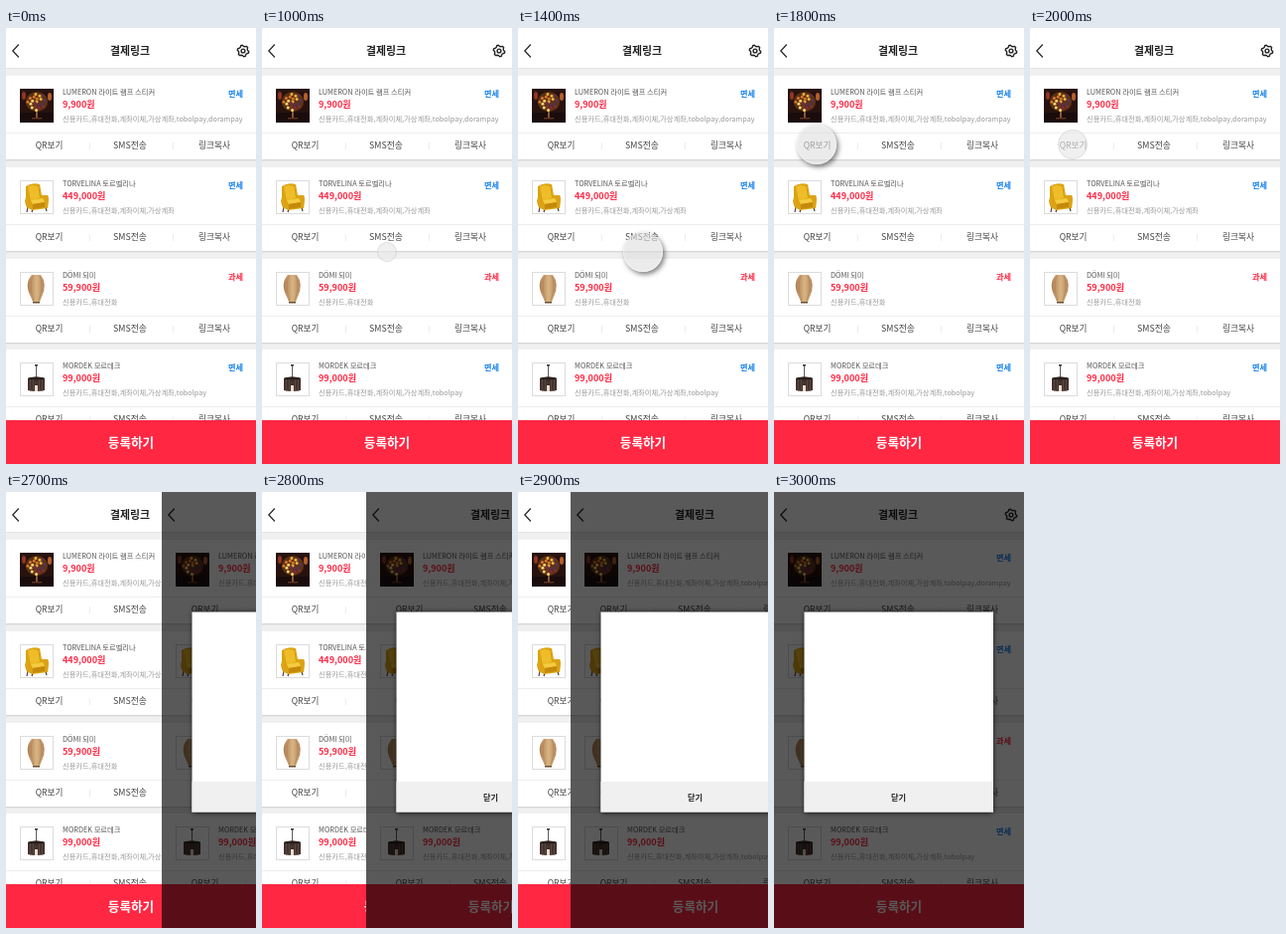
Recreate the animation shown at these times as an HTML page with a canvas. Size 252 by 438 pixels, loop 4.5 s.

```html
<!DOCTYPE html>
<html lang="ko">
<head>
<meta charset="utf-8">
<title>결제링크</title>
<style>
html, body { margin: 0; width: 100%; height: 100%; overflow: hidden; background: #fff; }
canvas { display: block; width: 252px; height: 438px; }
</style>
</head>
<body>
<canvas id="stage"></canvas>
<script>
const W = 252, H = 438, LOOP = 4500;
const RED = '#ff2742', BLUE = '#1680ee';
const FONT = '"Noto Sans CJK KR", "Noto Sans CJK", "Noto Sans", sans-serif';
const canvas = document.getElementById('stage');
const ctx = canvas.getContext('2d');
const dpr = window.devicePixelRatio || 1;
canvas.width = W * dpr;
canvas.height = H * dpr;

const BASE = '신용카드,휴대전화';
const BANK = BASE + ',계좌이체,가상계좌';
const items = [
  { name: 'LUMERON 라이트 램프 스티커', price: '9,900원', pay: BANK + ',tobolpay,dorampay', tax: '면세', photo: stickerLamp },
  { name: 'TORVELINA 토르벨리나', price: '449,000원', pay: BANK, tax: '면세', photo: armchair },
  { name: 'DÖMI 되미', price: '59,900원', pay: BASE, tax: '과세', photo: tableLamp },
  { name: 'MORDEK 모르데크', price: '99,000원', pay: BANK + ',tobolpay', tax: '면세', photo: pendant }
];

function rect(x, y, w, h, color) {
  ctx.fillStyle = color;
  ctx.fillRect(x, y, w, h);
}

function ellipse(x, y, rx, ry, color) {
  ctx.fillStyle = color;
  ctx.beginPath();
  ctx.ellipse(x, y, rx, ry, 0, 0, Math.PI * 2);
  ctx.fill();
}

function shape(path, color) {
  ctx.fillStyle = color;
  ctx.fill(new Path2D(path));
}

function line(path, color, width) {
  ctx.strokeStyle = color;
  ctx.lineWidth = width;
  ctx.stroke(new Path2D(path));
}

// y is the middle of the line of text
function text(str, x, y, size, color, align = 'left', weight = 400) {
  ctx.font = `${weight} ${size}px ${FONT}`;
  ctx.textAlign = align;
  ctx.fillStyle = color;
  ctx.fillText(str, x, y + size * 0.37);
}

function shadow(color, blur, dx, dy) {
  ctx.shadowColor = color;
  ctx.shadowBlur = blur * dpr;
  ctx.shadowOffsetX = dx * dpr;
  ctx.shadowOffsetY = dy * dpr;
}

// Product pictures, each in a 34 x 34 box
function stickerLamp() {
  rect(0, 0, 34, 34, '#28120f');
  rect(0, 24, 34, 10, '#1a0c0d');
  ellipse(17, 13, 11, 10, '#5e3215');
  const glow = ['#f0b43c', '#7c2f3c', '#d9772a', '#54305a', '#f6d774'];
  for (let i = 0; i < 20; i++) {
    const a = i * 2.4, r = 2.2 * Math.sqrt(i);
    ellipse(17 + r * Math.cos(a), 13 + r * Math.sin(a) * 0.9, 1.5, 1.5, glow[i % 5]);
  }
  ellipse(4, 7, 2, 4, '#8d3924');
  ellipse(30, 8, 2, 4, '#b5602a');
  rect(16, 23, 2, 6, '#8a5630');
  rect(12, 29, 10, 1.5, '#5c321f');
}

function armchair() {
  line('M8 27L7 32M26 27L27 31M13 29L12 32', '#5b3a20', 1.2);
  shape('M6 6Q12 2 20 4L22 15L28 15Q30 17 28 28L12 30L7 27Q4 22 6 17Z', '#dba313');
  shape('M8 6Q13 4 18 6L20 18L11 20Z', '#efbd2b');
  shape('M11 20L23 18L25 22L13 24Z', '#f6ca42');
  shape('M13 24L25 22V27L13 29Z', '#c48a0c');
}

function tableLamp() {
  const tone = ctx.createLinearGradient(7, 0, 25, 0);
  tone.addColorStop(0, '#a97a4c');
  tone.addColorStop(0.55, '#d9b484');
  tone.addColorStop(1, '#b08457');
  shape('M12 3H21Q28 12 22 25L20 30H13L11 25Q4 12 12 3Z', tone);
  line('M13 4Q9 14 14 29M20 4Q24 14 19 29', '#a87c50', 0.5);
  rect(13, 30, 7, 1.5, '#6b4c34');
}

function pendant() {
  line('M16.5 2V15', '#333', 0.8);
  rect(15, 2, 3, 1.5, '#333');
  shape('M8 16Q16.5 13 25 16V28Q16.5 30 8 28Z', '#43322d');
  line('M10.5 16V29M13.5 16V29M19.5 16V29M22.5 16V29', '#65504a', 0.7);
  rect(15, 23, 3, 6, '#e9dccb');
  ellipse(16.5, 16, 8.5, 1.5, '#2a1f1d');
}

function header() {
  rect(0, 0, W, 40, '#fff');
  ctx.lineCap = 'round';
  line('M12.5 17L6.8 23L12.5 29', '#222', 1.2);
  ctx.lineCap = 'butt';
  text('결제링크', 125, 22.8, 10.9, '#222', 'center', 700);
  gear(239, 23);
}

function gear(x, y) {
  ctx.beginPath();
  for (let i = 0; i < 24; i++) {
    const a = (i + 0.5) * Math.PI / 12;
    const r = i % 4 < 2 ? 5.8 : 4.6;
    ctx.lineTo(x + r * Math.cos(a), y + r * Math.sin(a));
  }
  ctx.closePath();
  ctx.strokeStyle = '#222';
  ctx.lineWidth = 1.4;
  ctx.stroke();
  ctx.beginPath();
  ctx.arc(x, y, 1.9, 0, Math.PI * 2);
  ctx.stroke();
}

function card(item, i) {
  const y = 48 + Math.round(i * 91.8);
  rect(0, y, W, 84, '#fff');
  rect(0, y + 84, W, 1, '#d6d6d6');
  rect(0, y + 85, W, 1, '#e8e8e8');
  ctx.save();
  ctx.translate(14, y + 13);
  item.photo();
  if (i) {
    ctx.strokeStyle = '#dcdcdc';
    ctx.lineWidth = 1;
    ctx.strokeRect(0.5, 0.5, 33, 33);
  }
  ctx.restore();
  text(item.name, 57, y + 16.5, 7.3, '#555');
  text(item.price, 57, y + 29, 9.05, RED, 'left', 700);
  text(item.pay, 57, y + 43, 7.25, '#999');
  text(item.tax, 239, y + 17.5, 8.2, item.tax === '면세' ? BLUE : RED, 'right', 700);
  rect(0, y + 57, W, 1, '#eee');
  rect(84, y + 67, 1, 7, '#eee');
  rect(168, y + 67, 1, 7, '#eee');
  text('QR보기', 43.5, y + 70, 8.6, '#444', 'center');
  text('SMS전송', 125, y + 70, 8.8, '#444', 'center');
  text('링크복사', 210, y + 70, 8.7, '#444', 'center');
}

function page() {
  rect(0, 0, W, H, '#f0f0f0');
  header();
  rect(0, 40, W, 1, '#e4e4e4');
  items.forEach(card);
  rect(0, 394, W, 44, RED);
  text('등록하기', 126, 416.5, 12.6, '#fff', 'center', 700);
}

function popup(x) {
  ctx.save();
  ctx.translate(x, 0);
  page();
  rect(0, 0, W, H, 'rgba(0,0,0,0.65)');
  shadow('rgba(0,0,0,0.9)', 5, 0, 0.5);
  rect(30.5, 120.5, 190.5, 201, '#fff');
  shadow('transparent', 0, 0, 0);
  rect(30.5, 291, 190.5, 30.5, '#f0f0f0');
  text('닫기', 125.5, 306.5, 8.2, '#222', 'center', 700);
  ctx.restore();
}

function touch(x, y, r, raised) {
  const disc = new Path2D();
  disc.arc(x, y, r, 0, Math.PI * 2);
  if (raised) {
    const outside = new Path2D();
    outside.rect(0, 0, W, H);
    outside.addPath(disc);
    ctx.save();
    ctx.clip(outside, 'evenodd');
    shadow('rgba(0,0,0,0.5)', 5, 2, 2.5);
    ctx.fillStyle = '#ddd';
    ctx.fill(disc);
    ctx.restore();
  }
  ctx.fillStyle = raised ? 'rgba(222,222,222,0.6)' : 'rgba(232,232,232,0.65)';
  ctx.fill(disc);
  ctx.beginPath();
  ctx.arc(x, y, r - 0.5, 0, Math.PI * 2);
  ctx.strokeStyle = raised ? 'rgba(255,255,255,0.5)' : 'rgba(0,0,0,0.1)';
  ctx.lineWidth = 0.8;
  ctx.stroke();
}

// The pointer grows, glides to the button and taps in 200 ms steps
function pointer(t) {
  const step = Math.floor((t - 1000) / 200);
  const move = Math.min(Math.max(step - 2, 0), 2) / 2;
  const x = 126 - 83 * move, y = 225 - 108 * move;
  const pressed = step === 5;
  const r = pressed ? 15 : Math.min(10 + step * 5, 20);
  touch(Math.round(x), Math.round(y), r, r === 20);
}

function draw(now) {
  const t = (now - start) % LOOP;
  ctx.setTransform(dpr, 0, 0, dpr, 0, 0);
  if (t < 3000) page();
  if (t >= 1000 && t < 2700) pointer(t);
  if (t >= 2700) {
    const step = Math.min(Math.floor((t - 2700) / 100), 3);
    popup(Math.ceil(157 * (1 - step / 3)));
  }
  requestAnimationFrame(frame);
}

function frame() {
  draw(performance.now());
}

const start = performance.now();
draw(start);
</script>
</body>
</html>
```
